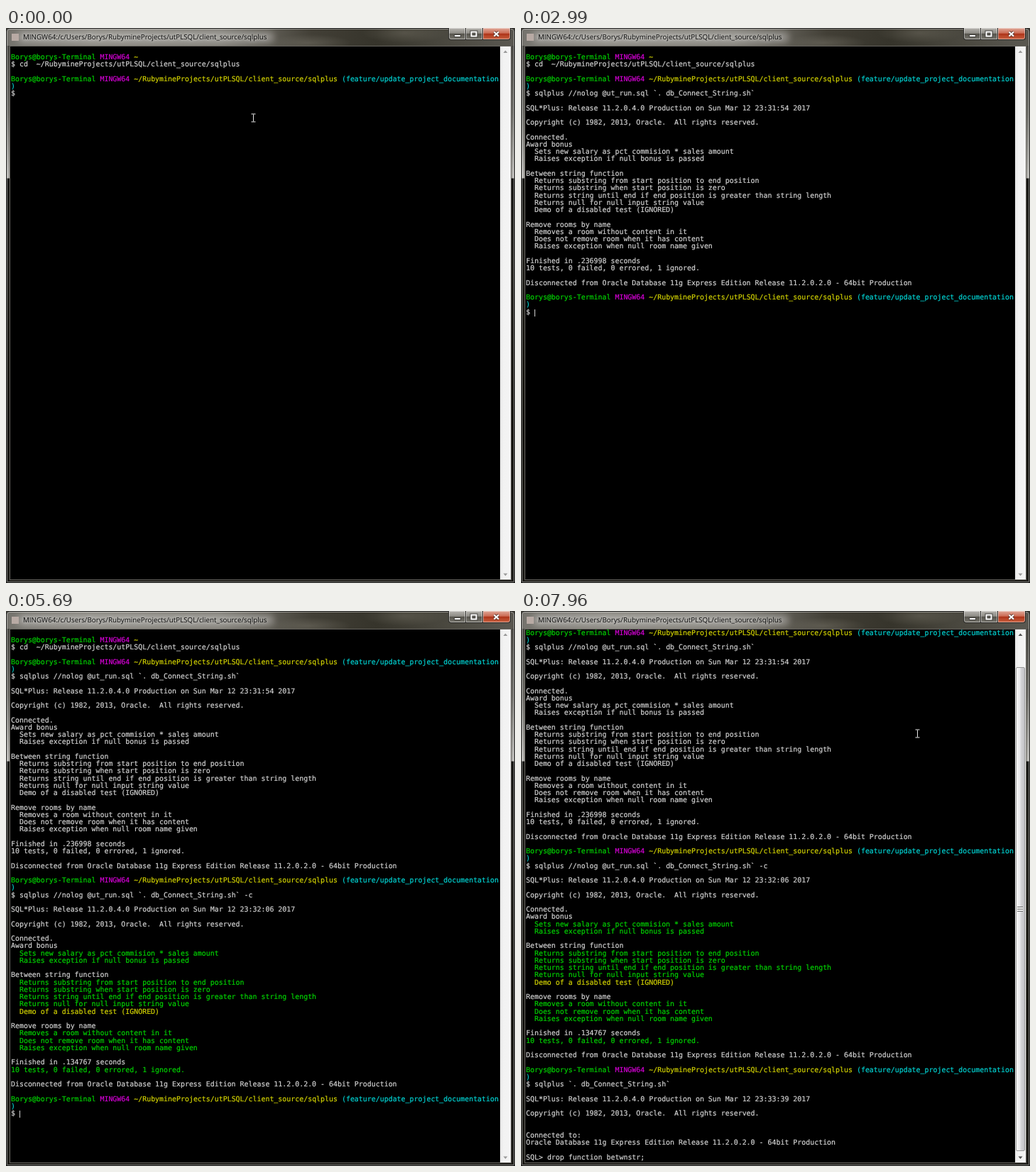
These frames come from a looping animation (717 px wide and 781 px high, 8 s). An HTML page:

```html
<!DOCTYPE html>
<html lang="en">
<head>
<meta charset="utf-8">
<title>Terminal session</title>
<style>
  html, body { margin: 0; width: 100%; height: 100%; overflow: hidden; background: #000; }
  #win {
    position: relative; width: 717px; height: 781px; overflow: hidden;
    background: linear-gradient(#34332d 0, #4b4a45 26px, #6f6e69 120px, #b4b3af 211px, #181815 212px, #24231e 330px, #15140f 560px, #1d1c18 781px);
  }
  #win * { position: absolute; box-sizing: border-box; }
  #edge { inset: 0; border: 1px solid #1a1a18; border-radius: 5px 5px 2px 2px; box-shadow: inset 0 0 0 1px #ffffff66; }
  #bar {
    left: 1px; top: 1px; width: 715px; height: 24px;
    background:
      radial-gradient(ellipse 60px 12px at 425px 20px, #716e6388, #0000),
      radial-gradient(ellipse 60px 14px at 560px 6px, #706c6077, #0000),
      linear-gradient(90deg, #75736d 0, #88867f 120px, #7f7d76 300px, #423f36 430px, #36342b 520px, #47453c 600px, #5a5851 715px);
  }
  #glow { left: 16px; top: 5px; width: 362px; height: 16px; border-radius: 8px; background: #d9d8d466; filter: blur(5px); }
  #icon { left: 8px; top: 8px; width: 10px; height: 10px; background: #b8aaa4; }
  #title {
    left: 24px; top: 5px; white-space: pre; color: #080808;
    font: 9.8px/15px "Open Sans", "Noto Sans", sans-serif; text-rendering: geometricPrecision;
    text-shadow: 0 0 4px #fff9, 0 0 7px #fff7;
  }
  .btn {
    top: 0; height: 17px; border: 1px solid #2b2a27; border-top: 0; box-shadow: inset 0 0 0 1px #ffffff70;
    background: linear-gradient(#b4b2ad, #8f8d87 46%, #54524b 50%, #77756d);
  }
  .close { background: linear-gradient(#dfa797, #cb6a53 46%, #ad3217 50%, #c9603f); border-radius: 0 0 4px 0; }
  #buttons { left: 0; top: 0; }
  #client { left: 5px; top: 25px; width: 707px; height: 752px; background: #000; border: 1px solid #66645f; }
  #term { left: 6px; top: 26px; width: 690px; height: 750px; overflow: hidden; }
  #text { left: 1px; top: 0; }
  #text div {
    white-space: pre; color: #d2d2d2; height: 10.25px; -webkit-text-stroke: .2px;
    font: 9.931px/10.25px "DejaVu Sans Mono", monospace; text-rendering: geometricPrecision;
  }
  #text span { position: static; }
  .g { color: #00d200; } .m { color: #d200d2; } .y { color: #d2d200; } .c { color: #00d2d2; }
  #caret { width: 1px; height: 10px; background: #d2d2d2; }
  #track { left: 696px; top: 26px; width: 15px; height: 750px; background: linear-gradient(90deg, #e6e6e6, #f2f2f2 30%, #f4f4f4); }
  #track svg { left: 0; top: 0; }
  #thumb {
    left: 1px; top: 53px; width: 13px; height: 681px; border: 1px solid #979797; border-radius: 2px;
    background: linear-gradient(90deg, #f5f5f5, #e9e9eb 48%, #d6d6d9 52%, #c4c4c8);
  }
  #grip { left: 1px; top: 336px; width: 8px; height: 7px; background: repeating-linear-gradient(#666 0 1px, #f4f4f4 1px 3px); }
  #mouse { width: 7px; height: 13px; }
</style>
</head>
<body>
<div id="win">
  <div id="bar"></div>
  <div id="glow"></div>
  <div id="edge"></div>
  <div id="icon"></div>
  <div id="title">MINGW64:/c/Users/Borys/RubymineProjects/utPLSQL/client_source/sqlplus</div>
  <div class="btn" style="left:623px;width:25px;border-radius:0 0 0 4px"></div>
  <div class="btn" style="left:647px;width:25px"></div>
  <div class="btn close" style="left:671px;width:40px"></div>
  <svg id="buttons" width="717" height="18" fill="none">
    <rect x="631.5" y="9.5" width="9" height="3" fill="#fff" stroke="#44433f"/>
    <rect x="655.5" y="5.5" width="7" height="6" stroke="#44433f" stroke-width="4"/>
    <rect x="655.5" y="5.5" width="7" height="6" stroke="#fff" stroke-width="2"/>
    <path d="M687.5 5.5l6.5 6M694 5.5l-6.5 6" stroke="#5b3a34" stroke-width="4"/>
    <path d="M687.5 5.5l6.5 6M694 5.5l-6.5 6" stroke="#fff" stroke-width="2.2"/>
  </svg>
  <div id="client"></div>
  <div id="term"><div id="text"></div></div>
  <div id="caret"></div>
  <div id="track">
    <svg id="arrows" width="15" height="750"><path d="M4.5 9l3-3.5 3 3.5zM4.5 741.5l3 3.5 3-3.5z"/></svg>
    <div id="thumb"><div id="grip"></div></div>
  </div>
  <svg id="mouse" fill="none" stroke="#e8e8e8"><path d="M.5 1H6.5M3.5 1.5V11.5M.5 12H6.5"/></svg>
</div>
<script>
const LOOP = 8000, CELL = 5.979, LINE = 10.25, SCROLL_AT = 7210, SCROLL_ROWS = 4;
const $ = id => document.getElementById(id);
const timed = [];

// Each part is plain text or "colour class|text".
function print(time, row, parts, col = 0) {
  const el = document.createElement('div');
  el.style.top = 0.5 + row * LINE + 'px';
  el.style.left = col * CELL + 'px';
  for (const part of [].concat(parts)) {
    const span = document.createElement('span');
    const [cls, text] = part.split('|');
    span.className = text === undefined ? '' : cls;
    span.textContent = text ?? cls;
    el.append(span);
  }
  $('text').append(el);
  timed.push({ el, time });
}

const DIR = '~/RubymineProjects/utPLSQL/client_source/sqlplus';
const WHO = ['g|Borys@borys-Terminal ', 'm|MINGW64 '];
const RUN = 'sqlplus //nolog @ut_run.sql `. db_Connect_String.sh`';
const DB = 'Oracle Database 11g Express Edition Release 11.2.0.2.0 - 64bit Production';

function prompt(time, row) {
  print(time, row, [...WHO, `y|${DIR} `, 'c|(feature/update_project_documentation']);
  print(time, row + 1, 'c|)');
  print(time, row + 2, '$');
}

function banner(time, row, clock) {
  print(time, row, `SQL*Plus: Release 11.2.0.4.0 Production on Sun Mar 12 ${clock} 2017`);
  print(time, row + 2, 'Copyright (c) 1982, 2013, Oracle.  All rights reserved.');
}

// steps: [first line index, time] pairs in order
function report(row, seconds, steps, coloured) {
  const lines = [
    'Award bonus',
    'g|  Sets new salary as pct commision * sales amount',
    'g|  Raises exception if null bonus is passed',
    '',
    'Between string function',
    'g|  Returns substring from start position to end position',
    'g|  Returns substring when start position is zero',
    'g|  Returns string until end if end position is greater than string length',
    'g|  Returns null for null input string value',
    'y|  Demo of a disabled test (IGNORED)',
    '',
    'Remove rooms by name',
    'g|  Removes a room without content in it',
    'g|  Does not remove room when it has content',
    'g|  Raises exception when null room name given',
    '',
    `Finished in ${seconds} seconds`,
    'g|10 tests, 0 failed, 0 errored, 1 ignored.',
    '',
    'Disconnected from ' + DB
  ];
  lines.forEach((line, i) => {
    const time = steps.findLast(s => s[0] <= i)[1];
    if (line) print(time, row + i, coloured ? line : line.replace(/^\w\|/, ''));
  });
}

print(0, 1, [...WHO, 'y|~']);
print(0, 2, '$ cd  ' + DIR);
prompt(0, 4);
print(230, 6, RUN, 2);
banner(1310, 8, '23:31:54');
print(1480, 12, 'Connected.');
report(13, '.236998', [[0, 2330], [5, 2430], [13, 2580], [19, 2670]], false);

prompt(2990, 34);
print(3900, 36, RUN + ' -c', 2);
banner(4530, 38, '23:32:06');
print(4610, 42, 'Connected.');
report(43, '.134767', [[0, 5300], [5, 5380], [19, 5550]], true);

prompt(5690, 64);
print(6450, 66, 'sqlplus `. db_Connect_String.sh`', 2);
banner(7140, 68, '23:33:39');
print(7210, 73, 'Connected to:');
print(7210, 74, DB);
print(7210, 76, 'SQL>');
print(7780, 76, 'drop function betwnstr;', 5);

// [time, screen row, column]; time alone hides the caret
const caret = [
  [0], [150, 6, 2], [230, 6, 54], [780], [840, 7, 0], [1310, 12, 0], [1480, 13, 0], [1960],
  [2330, 18, 0], [2430, 26, 0], [2580, 32, 0], [2670, 33, 0], [2990, 36, 2], [3500],
  [3900, 36, 57], [4360, 37, 0], [4530, 42, 0], [4610, 43, 0], [5080], [5300, 48, 0],
  [5380, 62, 0], [5550, 63, 0], [5690, 66, 2], [6140], [6450, 66, 34], [6610],
  [6910, 67, 0], [7140, 72, 0], [7210, 72, 5], [7460], [7780, 72, 28], [7960]
];
// [time, left, top]
const mouse = [[0, 345, 120], [840], [3120, 319, 511], [4360], [6140, 95, 728], [6910], [7460, 555, 166]];

function place(el, x, y, visible) {
  el.style.visibility = visible ? 'visible' : 'hidden';
  if (visible) el.style.transform = `translate(${x}px, ${y}px)`;
}
const current = (list, t) => list.findLast(e => e[0] <= t);

function draw(t) {
  for (const { el, time } of timed) el.style.visibility = t >= time ? 'visible' : 'hidden';
  const scrolled = t >= SCROLL_AT;
  $('text').style.top = (scrolled ? -SCROLL_ROWS * LINE : 0) + 'px';
  $('thumb').style.visibility = scrolled ? 'visible' : 'hidden';
  $('arrows').style.fill = scrolled ? '#505050' : '#9a9a9a';
  const [, row, col] = current(caret, t);
  place($('caret'), Math.round(7 + col * CELL), Math.round(26.5 + row * LINE), row !== undefined);
  const [, x, y] = current(mouse, t);
  place($('mouse'), x, y, x !== undefined);
}

const start = performance.now();
function tick() {
  draw((performance.now() - start) % LOOP);
  requestAnimationFrame(tick);
}
tick();
</script>
</body>
</html>
```
